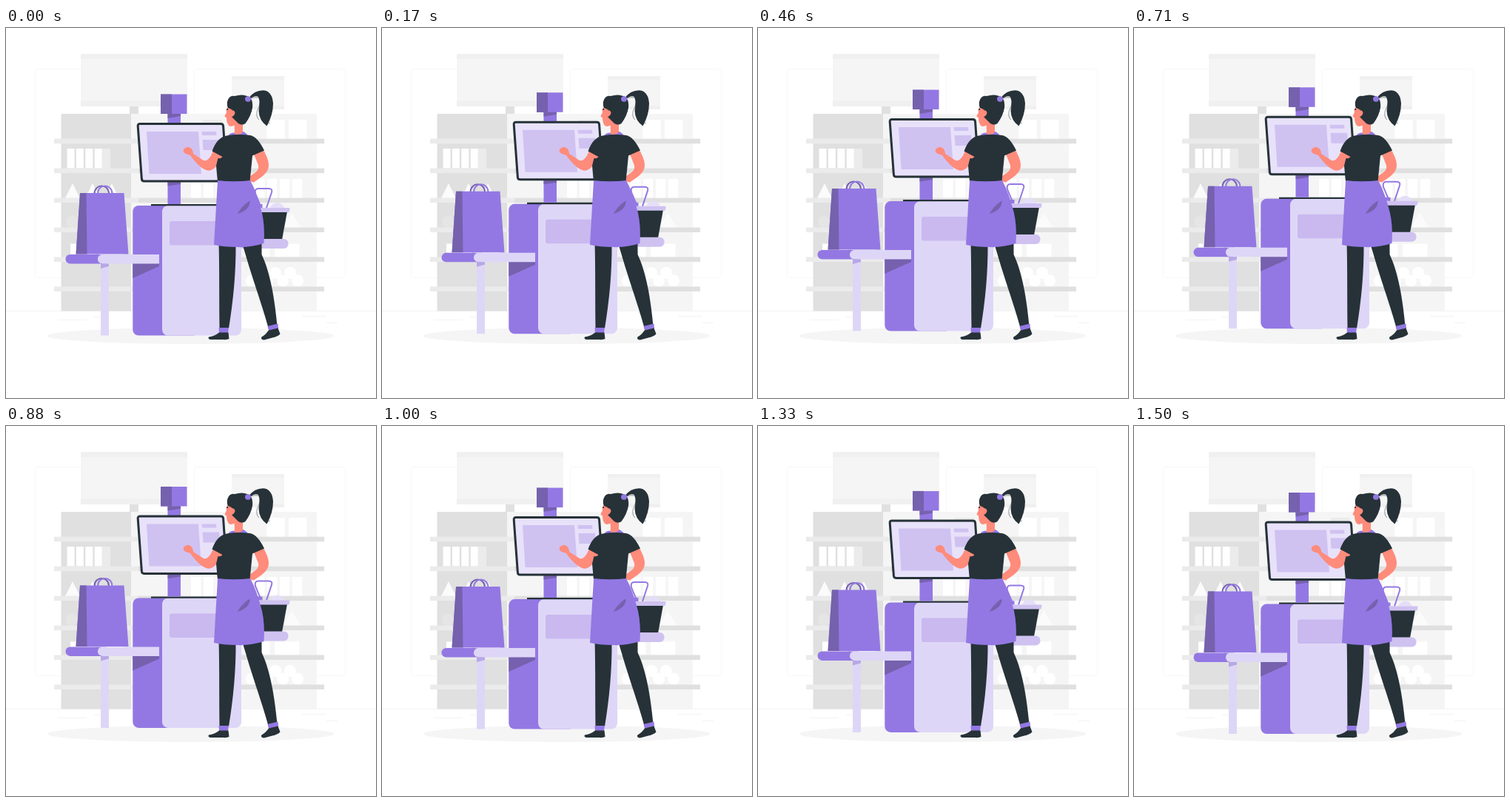
An HTML page that plays this animation: 500 px wide and 500 px high, repeating every 1540 ms.

```html
<!DOCTYPE html>
<html lang="en">
<head>
<meta charset="utf-8">
<title>Self checkout</title>
<style>
  html, body { margin: 0; height: 100%; overflow: hidden; background: #fff; }
  svg { display: block; width: 100%; height: 100%; }
  .purple { fill: #9378e3; }
  .shade { fill: #7561ad; }
  .light { fill: #ded6f7; }
  .lilac { fill: #cfc2f1; }
  .dark { fill: #263238; }
  .skin { fill: #ff8b7b; }
  .line { fill: none; stroke: #9378e3; stroke-width: 2; }
</style>
</head>
<body>
<svg viewBox="0 0 500 500">
  <g id="store">
    <g fill="none" stroke="#f8f8f8">
      <rect x="39.5" y="55.5" width="204" height="282" rx="3"/>
      <rect x="254.500" y="55.5" width="204" height="282" rx="3"/>
    </g>
    <path d="M0 382.500H500M400 389.500H432M433 398.500H448M70 394.500H109M119 390.500H127" stroke="#f3f3f3"/>
    <path d="M101 35H245V106H101ZM305 65H376V110H305Z" fill="#f5f5f5"/>
    <path d="M101 35H245V42H101ZM101 98H245V106H101ZM305 65H376V70H305ZM305 105H376V110H305Z" fill="#f0f0f0"/>
    <path d="M167 106H179V116H167ZM74.500 116H169V382.500H74.500Z" fill="#e0e0e0"/>
    <path d="M169 116H420V382.500H169Z" fill="#f5f5f5"/>
    <path d="M130 163H141V190H130ZM266 124H292V150H266Z" fill="#ebebeb"/>
    <path d="M80 230L90 210L100 230ZM107 230L117 210L127 230ZM133 230L143 210L153 230ZM374 270L386 250L399 270Z" fill="#fbfbfb"/>
    <g id="goods" fill="#fff"></g>
    <g fill="#fff">
      <circle cx="364" cy="331" r="8"/><circle cx="384" cy="331" r="8"/>
      <circle cx="332" cy="341.500" r="8"/><circle cx="353" cy="341.500" r="8"/>
      <circle cx="374" cy="341.500" r="8"/><circle cx="394" cy="341.500" r="8"/>
    </g>
    <g fill="#e5e5e5"><circle cx="89" cy="261.500" r="8"/><circle cx="110" cy="261.500" r="8"/><circle cx="131" cy="261.500" r="8"/></g>
    <g id="shelves"></g>
  </g>
  <ellipse cx="249.500" cy="416" rx="194" ry="11" fill="#f5f5f5"/>

  <g id="kiosk">
    <!-- basket -->
    <path class="line" d="M345 243L337 224Q335.500 217 341 217H355Q360.500 217 359 222L352 243"/>
    <path d="M357 243Q360 236 366 236Q373 236 376 243Z" fill="#e5def8"/>
    <path class="purple" d="M340 238H346.500V243H340Z"/>
    <path class="dark" d="M338 248H380L373 286H342Z"/>
    <path class="lilac" d="M334 243H382.500Q384 243 383.500 245L382.500 249H334Z"/>
    <rect class="lilac" x="310" y="285" width="71.500" height="13" rx="6"/>
    <!-- cabinet -->
    <rect class="purple" x="171.300" y="240" width="90" height="175.500" rx="8"/>
    <rect class="light" x="211" y="240" width="107" height="175.500" rx="8"/>
    <rect x="221" y="261" width="87" height="32.500" rx="3" fill="#c9b9ef"/>
    <path class="dark" d="M196 238H318V240.300H196Z"/>
    <!-- post and monitor -->
    <path class="purple" d="M218.500 115H236V238H218.500Z"/>
    <path class="shade" d="M218.500 115H236V119L218.500 122ZM218.500 207H236V211L218.500 213.500Z"/>
    <path class="purple" d="M209 89.500H244.500V116H209Z"/>
    <path class="shade" d="M209 89.500H224V116H209Z"/>
    <path d="M181 129.500H290.500Q293.300 129.500 293.600 132.500L298.500 204Q298.700 207 296 207H186.500Q183.700 207 183.400 204L178.200 132.500Q178 129.500 181 129.500Z" fill="#e8e1fa" stroke="#263238" stroke-width="3"/>
    <path class="lilac" d="M190 140H260L264 197H193.500ZM264.500 140H284L284.500 145H265ZM265.500 151H288L289 165H266.500Z"/>
    <!-- bagging table -->
    <path class="shade" d="M171.300 318H207V322L171.300 338Z"/>
    <path class="light" d="M128 318H139V415.500H128Z"/>
    <path d="M128 318H139V322L128 325Z" fill="#b8a7e6"/>
    <rect class="purple" x="80.500" y="306" width="60" height="12.500" rx="6.200"/>
    <path class="light" d="M207 306V318.500H130.200A6.200 6.200 0 0 1 130.200 306Z"/>
    <!-- bag -->
    <path d="M119.500 224C119.500 210 139 210 139 224" fill="none" stroke="#7561ad" stroke-width="2"/>
    <path class="purple" d="M100 223H159.500L165.500 305.500H94.500Z"/>
    <path class="shade" d="M100 223H108.500L109.500 305.500H94.500Z"/>
    <path class="line" d="M124 224C124 210 143.500 210 143.500 224"/>
  </g>

  <g id="shopper">
    <!-- legs and shoes -->
    <path class="dark" d="M287.500 290H310.500C311 330 307 370 301 406H288.500C288 365 288.500 325 287.500 290ZM319 290H345.500V306C357 330 363 365 366.500 402L354.500 405C345 370 333 340 319 290Z"/>
    <path class="purple" d="M287.500 405H301L300 412H288ZM353.500 403L367.500 399.500L368 406L355 409Z"/>
    <path class="dark" d="M288 411.500H300.500L301.500 420Q299 421.500 293 421H276Q272.500 420 274 417.500Q282 416.500 288 411.500ZM355 408.500L367.500 405.500L370.500 413.500Q367 417 360 418.500L349 421.500Q344.500 421.500 345 418Q351 414.500 355 408.500Z"/>
    <!-- arms -->
    <path class="skin" d="M281 164C277 173 273 181 267 179L253 170C253 163 247 159 243.500 161.500C239 163 238.500 167 242 169.500L249 172C256 182 265 191 272 192.500C281 194 287 184 293 173Z"/>
    <path class="skin" d="M334 168L348 165C353 174 357 184 354 191C351 199 341 204 335 208.500L328 207C328 201 331 199 336 196C342 192 342 187 340 183Z"/>
    <!-- neck, shirt and apron -->
    <path class="purple" d="M300 146Q302 141 310 141.500L319 139.500Q325 141 327 146Z"/>
    <path class="skin" d="M308.500 126L320 128V140Q318 145 309 143.500Z"/>
    <path class="dark" d="M298 145.500Q314 143 330 145Q340 147 349 165.500L333 172.500L329.500 208H286L284 186L286.500 176Q290 177 292.500 174L278.500 166.500Q285 148 298 145.500Z"/>
    <path class="purple" d="M286 206Q308 208.500 330 206Q339 222 346 250Q350 268 348.500 291Q330 297 312 296Q294 296 281 293Z"/>
    <path class="shade" d="M312.500 251Q320 239 329.500 233.500Q330 246 312.500 251Z"/>
    <!-- head -->
    <path class="skin" d="M301 105Q297 109 298 114L295.500 119Q295.500 121 298 121Q298 130 302 132.500Q306 134 311 130L318 122V106Z"/>
    <path d="M298 110.500L300 109.500" stroke="#263238" stroke-width="1.500"/>
    <path class="dark" d="M300 108Q297 101 301 95Q304 91 309 92Q321 88 330 94Q334 99 333 108Q331 119 323.500 129Q319 132 314 129L305 120Q307 117 307 113Q305 109 300 108Z"/>
    <path class="skin" d="M304 111.500Q309 110 309.500 115Q308 120 304 120Z"/>
    <path class="dark" d="M328 94.500Q337 83 350 84.500Q360 87 361 102Q361 117 352.500 132.500Q342 125 341.500 112Q344 95 340 92.500Q335 91 328 97Z"/>
    <path d="M330 95Q344 91 344 99Q342 107 339 113Q338 121 342 124M348 128Q353 131 357 128" fill="none" stroke="#263238" stroke-width=".5"/>
    <ellipse class="purple" cx="327" cy="96" rx="4" ry="3.700"/>
  </g>
</svg>
<script>
const byId = id => document.getElementById(id);
const rect = (x, y, w, h, fill) =>
  `<rect x="${x}" y="${y}" width="${w}" height="${h}" ${fill ? `fill="${fill}"` : ''}/>`;

// Each row of goods: first x, top, width, height, spacing, count
const rows = [
  [82.5, 163, 10, 26.5, 12.4, 4],
  [352, 124, 24.5, 26, 30, 2],
  [250, 204, 13.5, 26, 16.8, 3],
  [336, 204, 13.5, 26, 16.9, 4],
  [87, 291.5, 34, 18, 38, 2],
  [323, 291.5, 33.5, 18, 40, 2]
];
byId('goods').innerHTML = rows.map(([x, y, w, h, gap, count]) =>
  Array.from({ length: count }, (_, i) => rect(x + i * gap, y, w, h)).join('')).join('');

byId('shelves').innerHTML = Array.from({ length: 6 }, (_, i) => {
  const y = 149.7 + i * 39.95;
  return rect(65, y, 114, 6.5, '#ebebeb') + rect(179, y, 251, 6.5, '#e0e0e0');
}).join('');

const LOOP = 1540, STEPS = 37, LIFT = 10;
const kiosk = byId('kiosk');

function draw(now) {
  const step = Math.floor(now % LOOP / LOOP * STEPS + 0.1);
  const phase = (step + 1) / STEPS % 1;
  const rise = LIFT * (1 - Math.abs(2 * phase - 1));
  kiosk.setAttribute('transform', `translate(0 ${(0.54 - rise).toFixed(2)})`);
  requestAnimationFrame(draw);
}
draw(0);
</script>
</body>
</html>
```
